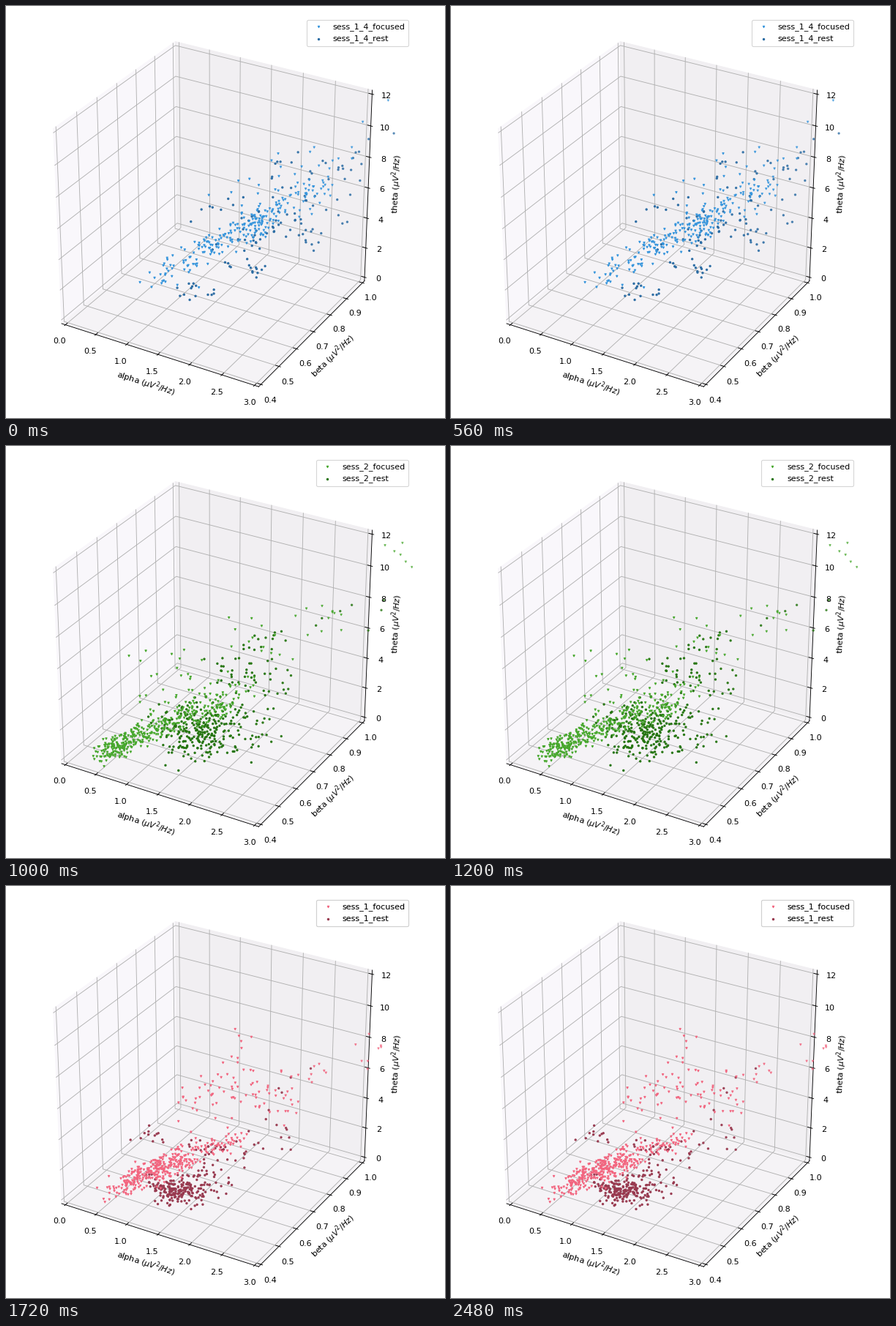
Write a matplotlib script that moves like this. It is 600 px wide and 563 px high and loops after 2520 ms.

```python
import numpy as np
import matplotlib.pyplot as plt
from matplotlib.animation import FuncAnimation
from matplotlib.colors import to_rgba
from matplotlib.patches import Polygon, Rectangle

W, H, DPI = 600, 563, 80
FRAMES, INTERVAL = 63, 40
SWITCHES = (22, 43)          # frames where the next session appears
EDGE = 0.5 * 25 / 24         # cube half-size including the margin

plt.rcParams["font.family"] = "DejaVu Sans"
plt.rcParams["font.size"] = 10
rng = np.random.default_rng(14)

fig = plt.figure(figsize=(W / DPI, H / DPI), dpi=DPI, facecolor="white")
ax = fig.add_axes([0, 0, 1, 1])
ax.set_xlim(-0.5, W - 0.5)
ax.set_ylim(H - 0.5, -0.5)
ax.axis("off")


def project(x, y, z):
    """Perspective view (elev 30, azim -60) of the centred unit cube."""
    right = 0.866 * x + 0.5 * y
    up = -0.25 * x + 0.433 * y + 0.866 * z
    depth = 10 - (0.433 * x - 0.75 * y + 0.5 * z)
    return 285.8 + 2983.5 * right / depth, 275.5 - 2919 * up / depth


def line(points, color, zorder):
    xs, ys = zip(*(project(*p) for p in points))
    ax.plot(xs, ys, color=color, lw=0.8, zorder=zorder,
            solid_capstyle="projecting", solid_joinstyle="round")


def draw_box():
    e = EDGE
    panes = [
        ("#f9f7fb", [(-e, -e, -e), (-e, e, -e), (-e, e, e), (-e, -e, e)]),
        ("#f1eff2", [(-e, e, -e), (e, e, -e), (e, e, e), (-e, e, e)]),
        ("#f5f3f6", [(-e, -e, -e), (e, -e, -e), (e, e, -e), (-e, e, -e)]),
    ]
    for color, corners in panes:
        ax.add_patch(Polygon([project(*c) for c in corners], fc=color,
                             ec=color, lw=0.8, zorder=1))

    inner, outer = e - 0.2 / 12, e + 0.1 / 12
    for t in np.linspace(-0.5, 0.5, 7):
        line([(t, -e, -e), (t, e, -e), (t, e, e)], "#b0b0b0", 2)
        line([(e, t, -e), (-e, t, -e), (-e, t, e)], "#b0b0b0", 2)
        line([(-e, -e, t), (-e, e, t), (e, e, t)], "#b0b0b0", 2)
        line([(t, -inner, -e), (t, -outer, -e)], "black", 3)
        line([(inner, t, -e), (outer, t, -e)], "black", 3)
        line([(inner, e, t), (outer, e, t)], "black", 3)
    line([(-e, -e, -e), (e, -e, -e)], "black", 3)
    line([(e, -e, -e), (e, e, -e)], "black", 3)
    line([(e, e, -e), (e, e, e)], "black", 3)


def tick_labels(values, form, start, middle, end):
    """Place labels on a shallow curve through three points."""
    u = np.linspace(0, 1, len(values))
    xs, ys = (np.polyval(np.polyfit([0, 0.5, 1], c, 2), u)
              for c in zip(start, middle, end))
    for x, y, value in zip(xs, ys, values):
        ax.text(x, y + 3.5, format(value, form), ha="center",
                va="baseline", zorder=8)


def axis_label(x, y, name, angle):
    ax.text(x, y, name + r" ($\mu V^2/Hz$)", rotation=angle, ha="center",
            va="center", rotation_mode="anchor", zorder=8)


def cloud(n, start, end, spread):
    """Random points around the segment from start to end."""
    t = rng.random((n, 1))
    middle = np.array(start) * (1 - t) + np.array(end) * t
    return middle + rng.normal(0, spread, (n, 2))


def blob(n, center, spread):
    return cloud(n, center, center, spread)


class Session:
    """Two point clouds with their legend."""

    def __init__(self, name, light, dark, focused, rest):
        self.artists = []
        handles = []
        for kind, color, marker, zorder, parts in (
                ("focused", light, "v", 6, focused),
                ("rest", dark, "o", 5, rest)):
            style = dict(marker=marker, s=3.8, linewidths=1.1)
            pts = np.vstack(parts)
            colors = np.tile(to_rgba(color), (len(pts), 1))
            colors[:, 3] = np.interp(pts[:, 0], [330, 545], [0.95, 0.6])
            points = ax.scatter(*pts.T, c=colors, zorder=zorder, **style)
            points.set_clip_path(Rectangle((3, 13), 552, 540,
                                           transform=ax.transData))
            self.artists.append(points)
            handles.append(ax.scatter([], [], color=color,
                                      label=f"{name}_{kind}", **style))
        legend = ax.legend(handles=handles, loc="upper right",
                           bbox_to_anchor=(555.2, 12.5),
                           bbox_transform=ax.transData)
        legend.set_zorder(9)
        ax.add_artist(legend)
        self.artists.append(legend)

    def show(self, on):
        for artist in self.artists:
            artist.set_visible(on)


draw_box()
tick_labels(np.linspace(0, 3, 7), ".1f",
            (72.5, 457.5), (199.5, 499), (332.5, 541))
tick_labels(np.linspace(0.4, 1, 7), ".1f",
            (360.5, 538), (432, 464.5), (498, 397.5))
tick_labels(range(0, 13, 2), "d",
            (508, 372), (513, 250.5), (519, 122.5))
axis_label(191, 515.5, "alpha", -17.7)
axis_label(446, 477.5, "beta", 44.6)
axis_label(533.5, 243, "theta", 87.4)

blue = Session(
    "sess_1_4", "#3494dc", "#2a6ba3",
    focused=[
        cloud(80, (210, 365), (300, 317), 9),
        cloud(95, (300, 315), (368, 284), 9.5),
        cloud(60, (360, 280), (435, 243), 11),
        cloud(14, (300, 270), (410, 195), (20, 12)),
        cloud(6, (180, 382), (272, 383), 7),
        cloud(9, (425, 255), (505, 150), (14, 14)),
    ],
    rest=[
        cloud(45, (300, 335), (420, 260), 17),
        cloud(24, (345, 225), (490, 220), (14, 17)),
        cloud(18, (400, 325), (460, 290), (14, 12)),
        cloud(12, (295, 353), (355, 362), 5),
        cloud(14, (240, 393), (285, 380), (8, 9)),
        cloud(8, (257, 288), (315, 260), 7),
        cloud(4, (478, 190), (536, 177), 5),
    ])

green = Session(
    "sess_2", "#46a72c", "#24740f",
    focused=[
        cloud(175, (130, 423), (185, 392), 8),
        cloud(190, (180, 393), (300, 352), 10),
        cloud(20, (300, 345), (345, 300), 12),
        cloud(16, (180, 305), (265, 308), (12, 15)),
        cloud(8, (180, 340), (235, 340), 8),
        cloud(12, (315, 245), (365, 285), 14),
        cloud(12, (400, 250), (455, 235), (10, 17)),
        cloud(6, (510, 105), (550, 175), (8, 10)),
    ],
    rest=[
        blob(155, (267, 398), (26, 16)),
        blob(90, (252, 374), (28, 15)),
        blob(30, (322, 385), (20, 20)),
        blob(45, (325, 312), (30, 17)),
        cloud(12, (280, 288), (390, 250), (10, 8)),
        cloud(12, (355, 370), (385, 315), 11),
        cloud(7, (420, 250), (520, 210), 13),
    ])

pink = Session(
    "sess_1", "#f2657f", "#98394f",
    focused=[
        cloud(40, (137, 420), (170, 402), 7),
        cloud(245, (165, 403), (245, 371), 9),
        cloud(80, (235, 374), (315, 342), 8.5),
        cloud(35, (238, 306), (330, 262), 12),
        blob(45, (352, 285), (34, 21)),
        cloud(8, (308, 185), (325, 245), 9),
        cloud(14, (390, 265), (530, 222), 14),
    ],
    rest=[
        blob(140, (240, 417), (19, 9)),
        cloud(45, (192, 404), (235, 412), 7),
        blob(40, (275, 402), (20, 13)),
        blob(24, (278, 362), (16, 10)),
        cloud(12, (180, 338), (215, 338), (6, 7)),
        cloud(18, (310, 375), (390, 340), (14, 14)),
        cloud(6, (345, 310), (440, 240), 14),
    ])

sessions = [blue, green, pink]


def update(frame):
    current = sum(frame >= s for s in SWITCHES)
    for i, session in enumerate(sessions):
        session.show(i == current)
    return []


anim = FuncAnimation(fig, update, frames=FRAMES, interval=INTERVAL,
                     repeat=True, repeat_delay=0, blit=False)
plt.show()
```
